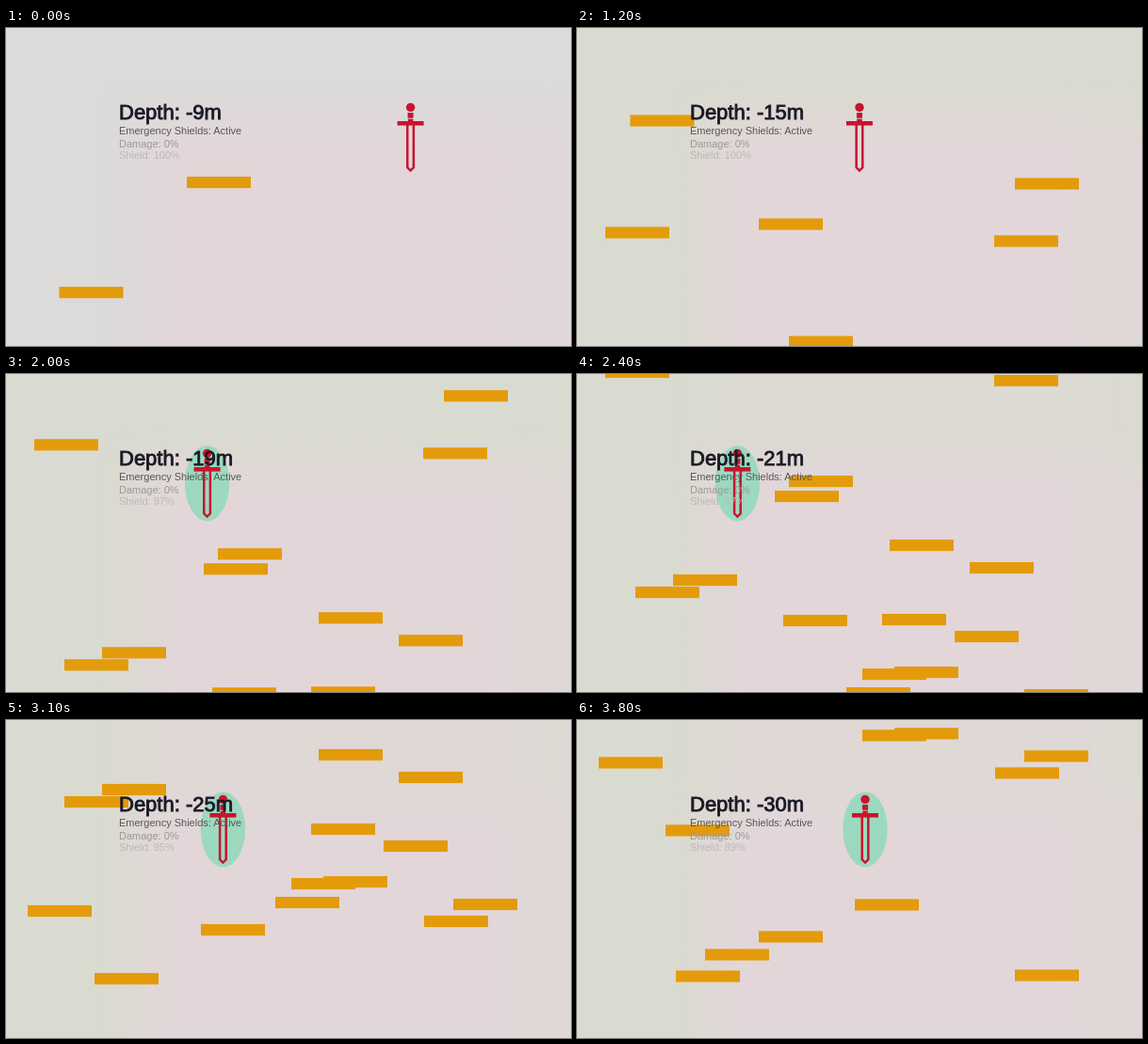
Recreate the animation shown at these times as an HTML page. Size 600 px wide and 338 px high, loop 3.9 s.

```html
<!DOCTYPE html>
<html lang="en">
<head>
<meta charset="utf-8">
<title>Depth</title>
<style>
html, body { margin: 0; width: 100%; height: 100%; overflow: hidden; background: #dadbd0; }
svg { display: block; width: 100vw; height: 100vh; }
text { font: 11px "Liberation Sans", Arial, sans-serif; }
#depth { font-size: 22px; }
</style>
</head>
<body>
<svg viewBox="0 0 600 338" preserveAspectRatio="none">
  <defs>
    <linearGradient id="across">
      <stop offset="0.17" stop-color="#e2d6d9" stop-opacity="0"/>
      <stop offset="0.3" stop-color="#e2d6d9"/>
      <stop offset="0.85" stop-color="#e2d6d9"/>
      <stop offset="1" stop-color="#e2d6d9" stop-opacity="0.6"/>
    </linearGradient>
    <linearGradient id="down" x2="0" y2="1">
      <stop id="top" offset="0.18" stop-color="#fff"/>
      <stop offset="0.38" stop-color="#fff"/>
    </linearGradient>
    <mask id="fade"><rect width="600" height="338" fill="url(#down)"/></mask>
  </defs>
  <rect id="base" width="600" height="338"/>
  <rect width="600" height="338" fill="url(#across)" mask="url(#fade)"/>
  <g id="bars" fill="#e49b0b"></g>
  <g id="player">
    <ellipse id="shield" cy="116.2" rx="23.7" ry="40" fill="#9cd9bf"/>
    <g fill="#c9142e">
      <circle cy="84.4" r="4.7"/>
      <rect x="-3" y="90" width="6" height="5.7"/>
      <rect x="-2.7" y="96.6" width="5.4" height="3"/>
      <rect x="-14" y="99" width="28" height="4.6"/>
      <path d="M-3.3 103V148.3L0 151.6L3.3 148.3V103" fill="none" stroke="#c9142e" stroke-width="2.5"/>
    </g>
  </g>
  <text id="depth" x="120" y="97.2" fill="#1c1a27" stroke="#1c1a27" stroke-width="0.9"></text>
  <text x="120" y="113" fill="#595659">Emergency Shields: Active</text>
  <text x="120" y="127" fill="#9a9897">Damage: 0%</text>
  <text id="power" x="120" y="138.8" fill="#bdb8b6"></text>
</svg>
<script>
const LOOP = 3900, STEP = 100;
const BAR = { w: 68, h: 12.2 };
const SWORD = { half: 14, top: 76, bottom: 153 };
const $ = id => document.getElementById(id);

// x and starting height of each platform
const layout = [
  [192, 158], [56.5, 275], [465, 342], [193, 385], [30, 394], [443, 403],
  [225, 510], [210, 526], [332, 578], [417, 602], [102, 615], [62, 628],
  [324, 657], [219, 658], [401, 675], [337, 713], [303, 715], [286, 735],
  [475, 737], [23, 744], [444, 755], [207, 764], [94, 816], [295, 895],
  [193, 929], [136, 948], [465, 970], [105, 971]
];

// the fall gains speed steadily, the sword bounces at constant speed
const scroll = t => 0.1368 * t + 1.28e-5 * t * t;
const swordX = t => 162.6 + 0.108 * Math.abs(t - 2472);

function touches(x, y, t) {
  const top = y - scroll(t), gap = x - swordX(t);
  return gap < SWORD.half && gap + BAR.w > -SWORD.half
    && top < SWORD.bottom && top + BAR.h > SWORD.top;
}

function hitTime(x, y) {
  let t = 0;
  while (t < LOOP && !touches(x, y, t)) t += STEP;
  return t;
}

const platforms = layout.map(([x, y]) => {
  const bar = document.createElementNS("http://www.w3.org/2000/svg", "rect");
  bar.setAttribute("x", x);
  bar.setAttribute("width", BAR.w);
  bar.setAttribute("height", BAR.h);
  $("bars").append(bar);
  return { bar, y, hit: hitTime(x, y) };
});

function draw(t) {
  const s = scroll(t);
  let hits = 0;
  for (const { bar, y, hit } of platforms) {
    bar.setAttribute("y", y - s);
    bar.style.display = t < hit ? "" : "none";
    if (t >= hit) hits++;
  }

  $("player").setAttribute("transform", `translate(${swordX(t)} 0)`);
  $("shield").style.display = hits ? "" : "none";
  $("depth").textContent = `Depth: -${Math.floor(9.7 + s / 34)}m`;
  $("power").textContent = `Shield: ${Math.round(100 - 2.67 * hits)}%`;

  $("base").setAttribute("fill", t < 1000 ? "#dcdbda" : "#dadbd0");
  $("top").setAttribute("stop-opacity", Math.min(Math.max((t - 2000) / 1600, 0), 0.6));
}

function tick(now) {
  draw(Math.floor(now % LOOP / STEP) * STEP);
  requestAnimationFrame(tick);
}

draw(0);
requestAnimationFrame(tick);
</script>
</body>
</html>
```
